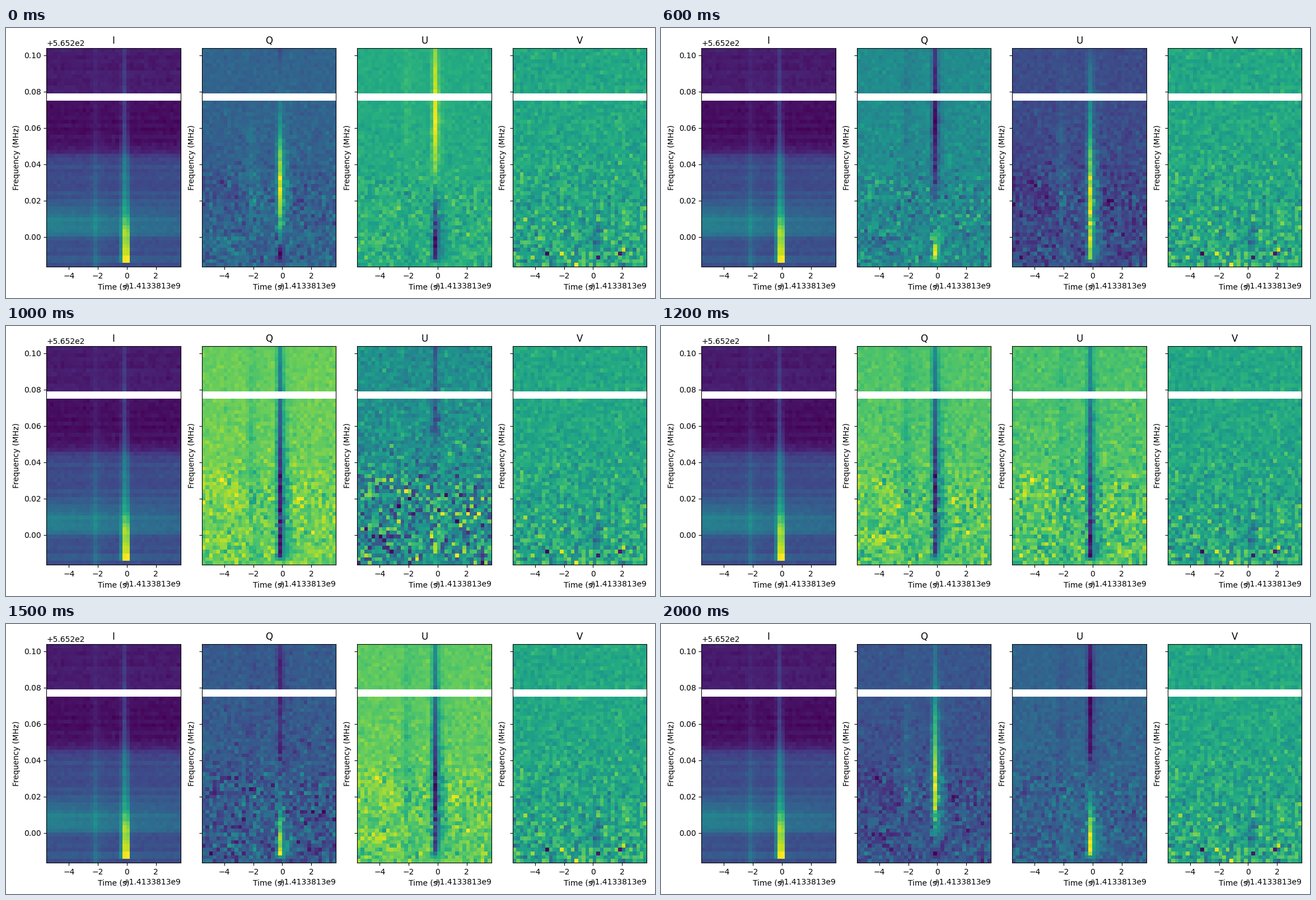
A matplotlib script that plays this animation: 1159 px wide and 483 px high, repeating every 2100 ms.

```python
import numpy as np
import matplotlib.pyplot as plt
from matplotlib.animation import FuncAnimation

W, H, DPI = 1159, 483, 100
ROWS, COLS = 58, 37
FRAMES, STEP_MS = 21, 100
T0, F0 = 1.4133813e9, 565.2
T_LIM, F_LIM = (-5.54, 3.71), (-0.01644, 0.10394)
LEFT, TOP, BOTTOM, WIDTH, PITCH = 72.4, 36.2, 427.2, 239.5, 277.5

rng = np.random.default_rng(11)
df = (F_LIM[1] - F_LIM[0]) / ROWS
f = (F_LIM[0] + (np.arange(ROWS) + 0.5) * df)[:, None]
cols = np.arange(COLS)
low = np.clip((0.1 - f) / 0.11, 0, 1)


def below(edge, soft):
    """Smooth step: 1 below the edge frequency, 0 above it."""
    return 1 / (1 + np.exp(np.clip((f - edge) / soft, -50, 50)))


def bump(x, centre, width):
    return np.exp(-((x - centre) / width) ** 2)


def noise():
    return rng.normal(size=(ROWS, COLS)).clip(-2.9, 2.9)


def pulse(peak, tail):
    """Narrow leading edge, then a trailing side of adjustable width."""
    lag = cols - peak
    return np.where(lag < 0, bump(lag, 0, 0.87),
                    np.exp(-np.maximum(lag, 0) / tail))


def blank(a):
    a[44:46] = np.nan
    return a


def intensity():
    base = (0.07 + 0.04 * (f > 0.078) + 0.17 * below(0.046, 0.0015)
            + 0.06 * low * below(0.03, 0.008) - 0.07 * below(0, 0.0008)
            + 0.12 * bump(f, 0.007, 0.008) + 0.13 * bump(f, -0.0125, 0.0015))
    amp = 0.07 + 0.22 * low + 0.36 * below(0.004, 0.004)
    amp = amp * (f > -0.0145)
    tilt = np.linspace(1, -1, COLS) * 0.05 * bump(f, 0.008, 0.008)
    img = base + tilt + 0.016 * (0.4 + low) * rng.normal(size=(ROWS, 1))
    img = img + 0.01 * noise()
    img += amp * np.maximum(pulse(21, 0.5), low * (cols == 22))
    img += (0.02 + 0.07 * low) * pulse(13, 1.2)
    return blank(img.clip(0.02, 1))


def circular():
    img = 0.6 + (0.035 + 0.075 * below(0.025, 0.014)) * noise()
    img -= 0.2 * bump(f, 0, 0.009) * bump(cols, 22, 1.6)
    img = img.clip(0.2, 0.88)
    for v in (0, 0.07, 0.07, 0.93, 0.96, 1):
        img[rng.integers(0, 14), rng.integers(8, 34)] = v
    return blank(img)


def linear():
    """Complex polarisation Q + iU with every channel aligned."""
    amp = 1 - 0.6 * np.clip((f - 0.01) / 0.09, 0, 1) ** 1.3
    amp = amp * (1 - below(-0.0135, 0.0008))
    sd = 0.028 + 0.03 * below(0.06, 0.01) + 0.045 * below(0.034, 0.002)
    z = amp * (pulse(21, 0.8 + 0.5 * low) + 0.16 * pulse(13, 2))
    z = z + sd * (noise() + 1j * noise())
    z -= 0.07 * bump(f, 0.024, 0.012) * (bump(cols, 7, 5) + bump(cols, 26, 3))
    z = z - 0.5 * z.mean(axis=1, keepdims=True)

    angle = 217 + 16 * np.exp(-(f + 0.01) / 0.012)
    z = z * np.exp(1j * np.radians(angle))
    streak = np.exp(1j * np.radians(2 * rate - 90))
    return z + 0.27 * streak * bump(f, -0.001, 0.002) * bump(cols, 6, 4)


# Degrees turned per step, proportional to wavelength squared
rate = 0.609 / (f + 0.155) ** 2
pol = linear()


def rotated(k):
    z = pol * np.exp(1j * np.radians((k - 12) * rate))
    return blank(z.real.copy()), blank(z.imag.copy())


fig = plt.figure(figsize=(W / DPI, H / DPI), dpi=DPI, facecolor="white")
extent = (T0 + T_LIM[0], T0 + T_LIM[1], F0 + F_LIM[0], F0 + F_LIM[1])
images = []
for n, (name, data) in enumerate(
        zip("IQUV", [intensity(), *rotated(0), circular()])):
    ax = fig.add_axes([(LEFT + PITCH * n) / W, 1 - BOTTOM / H,
                       WIDTH / W, (BOTTOM - TOP) / H])
    images.append(ax.imshow(data, extent=extent, origin="lower",
                            aspect="auto", interpolation="nearest",
                            cmap="viridis"))
    ax.set_title(name)
    ax.set_xlabel("Time (s)")
    ax.set_ylabel("Frequency (MHz)")
    ax.set_xticks(T0 + np.arange(-4, 3, 2))
    ax.set_yticks(F0 + np.arange(6) * 0.02)
    ax.ticklabel_format(axis="x", useOffset=T0)
    ax.ticklabel_format(axis="y", useOffset=F0)
    if n:
        ax.tick_params(labelleft=False)
        ax.yaxis.get_offset_text().set_visible(False)


def update(k):
    for im, data in zip(images[1:3], rotated(k)):
        im.set_data(data)
        im.set_clim(np.nanmin(data), np.nanmax(data))
    return images


anim = FuncAnimation(fig, update, frames=FRAMES, interval=STEP_MS,
                     repeat=True, repeat_delay=0, blit=False)
plt.show()
```
